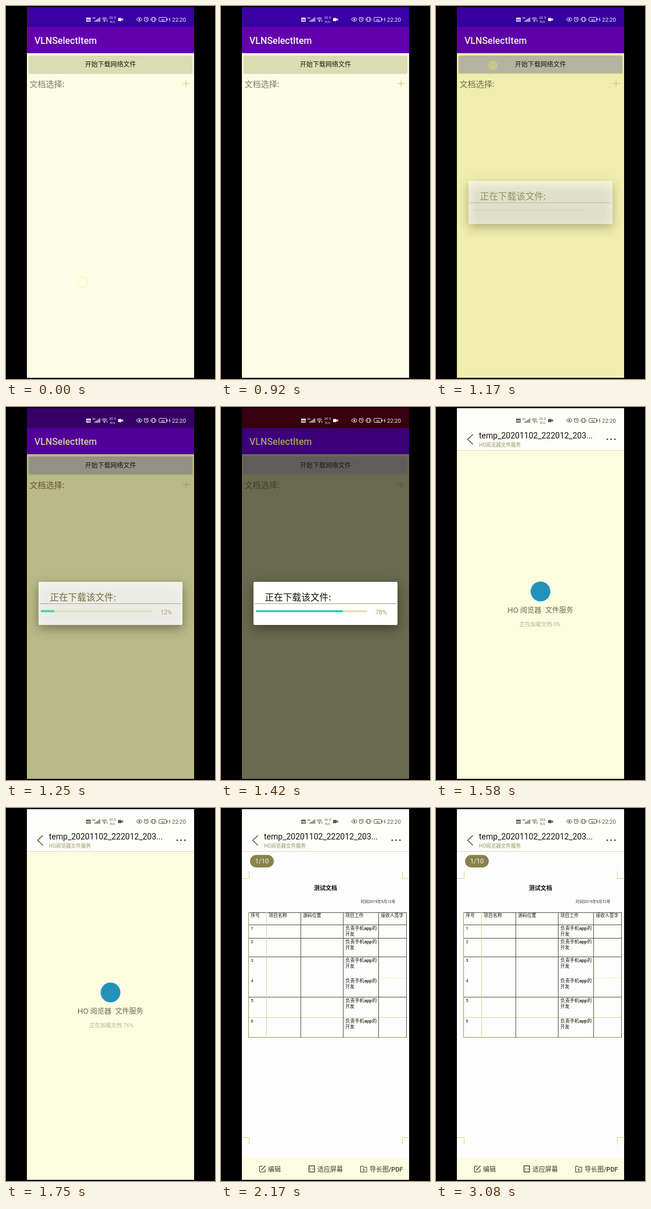
Recreate the animation shown at these times as an HTML page with a canvas. Size 360 by 640 pixels, loop 3660 ms.

```html
<!DOCTYPE html>
<html lang="zh-CN">
<head>
<meta charset="utf-8">
<title>File viewer</title>
<style>
html, body { margin: 0; width: 100%; height: 100%; overflow: hidden; background: #000; }
canvas { display: block; width: 360px; height: 640px; }
</style>
</head>
<body>
<canvas id="stage" width="360" height="640"></canvas>
<script>
const g = document.getElementById('stage').getContext('2d');
const LOOP = 3660;
const FONT = 'Roboto, "Noto Sans CJK SC", "Noto Sans CJK", sans-serif';
const CJK = '"Noto Sans CJK SC", "Noto Sans CJK", sans-serif';

// Colours for the idle, opening and fully dimmed screen
const TONES = {
  page: [[253, 253, 230], [240, 238, 174], [105, 105, 80]],
  bar: [[99, 0, 174], [93, 0, 168], [60, 0, 122]],
  status: [[57, 0, 164], [54, 0, 158], [54, 0, 16]],
  button: [[220, 219, 177], [181, 180, 160], [94, 93, 91]],
  title: [[247, 245, 238], [240, 236, 205], [166, 158, 98]],
  label: [[124, 121, 98], [112, 108, 78], [67, 64, 34]],
  plus: [[217, 209, 132], [209, 202, 132], [82, 81, 72]]
};

function tone(name, d) {
  const i = d < 1 ? 0 : 1, set = TONES[name];
  return `rgb(${set[i].map((v, k) => Math.round(v + (set[i + 1][k] - v) * (d - i)))})`;
}

function rect(x, y, w, h, color) {
  g.fillStyle = color;
  g.fillRect(x, y, w, h);
}

function round(x, y, w, h, r, color) {
  g.fillStyle = color;
  g.beginPath();
  g.roundRect(x, y, w, h, r);
  g.fill();
}

function disc(x, y, r, color) {
  g.fillStyle = color;
  g.beginPath();
  g.arc(x, y, r, 0, Math.PI * 2);
  g.fill();
}

function ring(x, y, r, a = 0, b = Math.PI * 2) {
  g.beginPath();
  g.arc(x, y, r, a, b);
  g.stroke();
}

function path(points, color, width = 1) {
  g.strokeStyle = color;
  g.lineWidth = width;
  g.beginPath();
  for (let i = 0; i < points.length; i += 2) g.lineTo(points[i], points[i + 1]);
  g.stroke();
}

function text(str, x, y, size, color, { weight = 400, align = 'left', face = FONT } = {}) {
  g.font = `${weight} ${size}px ${face}`;
  g.textAlign = align;
  g.fillStyle = color;
  g.fillText(str, x, y);
}

function statusBar(ink, paper, t) {
  round(138, 20, 8, 7, 1, ink);
  text('HD', 142, 25.5, 5, paper, { weight: 700, align: 'center' });

  text('5G', 149, 22, 4, ink, { weight: 700 });
  for (let i = 0; i < 5; i++) rect(152 + i * 2.2, 25.5 - i * 1.5, 1.3, 1.5 + i * 1.5, ink);

  g.strokeStyle = ink;
  g.lineWidth = 1;
  for (const r of [2.5, 4.7, 7]) ring(169.5, 27, r, -2.3, -0.84);
  disc(169.5, 26.3, 1, ink);
  if (t < 2830 || t >= 3080) rect(173.5, 24, 1, 3, ink);

  text(t < 2750 ? '20.5' : '353', 183.5, 22.3, 5.8, ink, { align: 'center' });
  text('K/s', 183.5, 29, 5.5, ink, { align: 'center' });

  round(193, 20.5, 6, 5.5, 1, ink);
  g.beginPath();
  g.moveTo(198.5, 23);
  g.lineTo(201.5, 20.8);
  g.lineTo(201.5, 25.8);
  g.fill();

  g.lineWidth = 1;
  g.beginPath();
  g.ellipse(229.7, 23, 4.3, 3, 0, 0, Math.PI * 2);
  g.stroke();
  disc(229.7, 23, 1.6, ink);

  ring(241.5, 23.3, 3.4);
  path([241.5, 21.2, 241.5, 23.6, 243.2, 23.6], ink, 0.8);
  path([237.5, 20.6, 239.3, 18.8], ink);
  path([243.7, 18.8, 245.5, 20.6], ink);

  g.strokeRect(251.8, 19.5, 4.4, 7);
  path([249.8, 20.8, 249.8, 25.3], ink);
  path([258.2, 20.8, 258.2, 25.3], ink);

  g.lineWidth = 0.9;
  g.beginPath();
  g.roundRect(263.5, 19.5, 13, 7, 1.5);
  g.stroke();
  rect(277, 21.5, 1.3, 3, ink);
  text('40', 270, 25.5, 6, ink, { align: 'center' });
  path([282.5, 19.8, 280.7, 23.2, 283, 23.2, 281.4, 26.6], ink, 0.9);
  text('22:20', 286, 26.7, 9.6, ink);
}

function homeScreen(t, d) {
  rect(36, 2, 288, 636, tone('page', d));
  rect(36, 2, 288, 34, tone('status', d));
  rect(36, 36, 288, 45, tone('bar', d));
  statusBar('#f4f2ee', tone('status', d), t);
  text('VLNSelectItem', 49, 65, 16, tone('title', d), { weight: 500 });

  g.save();
  g.shadowColor = 'rgba(80,80,20,.3)';
  g.shadowBlur = 2;
  g.shadowOffsetY = 1;
  round(39, 85, 282, 30, 2, tone('button', d));
  g.restore();
  text('开始下载网络文件', 180, 104, 11, '#1c1b10', { weight: 500, align: 'center' });

  text('文档选择:', 40.5, 138.5, 14.1, tone('label', d), { face: CJK });
  path([304.5, 133, 316, 133], tone('plus', d), 1.3);
  path([310.2, 127.3, 310.2, 138.8], tone('plus', d), 1.3);
}

function dialog(alpha, pct) {
  g.save();
  g.globalAlpha = alpha;
  g.save();
  g.shadowColor = 'rgba(30,30,0,.5)';
  g.shadowBlur = 18;
  g.shadowOffsetY = 6;
  round(56, 300, 248, 74, 2, '#fff');
  g.restore();
  text('正在下载该文件:', 75.5, 332, 15.7, alpha < 1 ? '#605c20' : '#121208', { weight: 500, face: CJK });
  rect(58, 337, 244, 1, '#a5a286');
  if (pct) {
    rect(60, 348.7, 192, 3.3, '#e4dfa9');
    rect(60, 348.7, 1.92 * pct, 3.3, '#12d6ac');
    text(pct + '%', 276, 355.7, 10.8, '#a29d59', { align: 'center' });
  } else {
    rect(60, 350, 192, 1, '#ccc89c');
  }
  g.restore();
}

function viewerHeader(t) {
  rect(36, 2, 288, 72, '#fdfdfb');
  rect(36, 74, 288, 1, '#dfddb8');
  statusBar('#5b5935', '#fdfdfb', t);
  path([63.5, 47, 54.5, 55.5, 63.5, 64], '#55522a', 1.4);
  text('temp_20201102_222012_203...', 74, 54, 14, '#161608');
  text('HO阅览器文件服务', 74, 68, 8.6, '#9b965e');
  for (let i = 0; i < 3; i++) disc(295 + i * 6.6, 55.3, 1.4, '#4b481f');
}

function loadScreen(t, pct) {
  rect(36, 2, 288, 636, '#fcfce1');
  viewerHeader(t);
  disc(180, 316.5, 17, '#2292ba');
  const ink = '#6c694c';
  text('HO', 123, 353, 13.5, ink);
  text('阅览器', 145, 353, 12.2, ink);
  rect(184.5, 344, 0.7, 10, '#d9d6b0');
  text('文件服务', 188, 353, 12.1, ink);
  text('正在加载文档 ' + pct + '%', 143.5, 376, 9.4, '#b7b391');
}

function pageCorners() {
  for (const [x, dx] of [[48.5, -12], [312.5, 12]])
    for (const [y, dy] of [[121, -12], [565.5, 12]])
      path([x + dx, y, x, y, x, y + dy], '#d4cd72', 0.9);
}

function table() {
  const cols = [48, 79, 138, 211, 272, 320];
  const rows = [180, 201, 224, 256, 290, 325, 360, 394];
  const dark = '#45432d', pale = '#d8d390', olive = '#918d45';
  const colInk = [olive, pale, dark, dark, dark, dark];
  const rowInk = [dark, dark, dark, dark, null, dark, pale, olive];
  rows.forEach((y, i) => rowInk[i] && path([48, y - 0.5, 320, y - 0.5], rowInk[i], 0.9));
  cols.forEach((x, i) => path([x - 0.5, 179, x - 0.5, 394], colInk[i], 0.9));
  g.setLineDash([2, 2]);
  path([272, 291.5, 320, 291.5], '#e4e0b4', 0.9);
  g.setLineDash([]);

  const ink = '#161612';
  ['序号', '项目名称', '源码位置', '项目工作', '接收人签字'].forEach((s, i) =>
    text(s, cols[i] + 3.3, 187, 7.8, ink, { weight: 500 }));
  [209, 232, 264, 299, 333, 368].forEach((y, i) => {
    text(i + 1, 51.3, y, 7.8, ink);
    text('负责手机app的', 214.3, y, 8.1, ink, { weight: 500 });
    text('开发', 214.3, y + 10, 7.8, ink, { weight: 500 });
  });
}

function toolbar() {
  rect(36, 600, 288, 38, '#fcfce3');
  const ink = '#3d3a20';
  text('编辑', 81, 623.5, 11, ink, { weight: 500 });
  text('适应屏幕', 166, 623.5, 11, ink, { weight: 500 });
  text('导长图/PDF', 256, 623.5, 11, ink, { weight: 500 });

  path([72, 614.5, 66.5, 614.5, 66.5, 624.5, 76, 624.5, 76, 619.5], ink);
  path([69.5, 621.5, 76.5, 614], ink, 1.3);

  g.strokeRect(151.5, 614, 9.5, 10.5);
  path([153, 619.3, 155.3, 619.3], ink);
  path([157.2, 619.3, 159.5, 619.3], ink);

  path([240.5, 624.5, 240.5, 614.5, 244.5, 614.5, 246, 616.3, 251, 616.3, 251, 624.5, 240, 624.5], ink);
  path([245.8, 617.5, 245.8, 622.3], ink);
  path([243.7, 620.3, 245.8, 622.4, 247.9, 620.3], ink);
}

function documentScreen(t) {
  rect(36, 2, 288, 636, '#fdfdfd');
  viewerHeader(t);
  pageCorners();
  text('测试文档', 180, 141, 10, '#0c0c08', { weight: 700, align: 'center' });
  text('时间2019年9月12号', 300.5, 163, 6.7, '#35331c', { align: 'right' });
  table();
  round(50, 80.5, 41, 21.5, 10.75, '#88834d');
  text('1/10', 70.5, 95.3, 11.2, '#f8f7e9', { align: 'center' });
  toolbar();
}

// start, dim, dialog opacity, percent
const STEPS = [
  [0, 0, 0, 0], [1170, 1, 0.6, 0], [1250, 1.4, 0.85, 12],
  [1330, 1.8, 1, 45], [1420, 2, 1, 78], [1500, 1.5, 0, 0]
];

function draw(t) {
  rect(0, 0, 360, 640, '#000');
  if (t >= 1830) return documentScreen(t);
  if (t >= 1580) return loadScreen(t, t < 1670 ? 0 : t < 1750 ? 32 : 76);

  const [, dim, alpha, pct] = STEPS.findLast(s => t >= s[0]);
  homeScreen(t, dim);
  if (t < 80) {
    g.strokeStyle = '#f1eda0';
    g.lineWidth = 1;
    g.setLineDash([3, 1]);
    ring(132, 474, 9);
    g.setLineDash([]);
  }
  if (t >= 1080 && t < 1250) disc(98, 102, 8.3, '#c9c58f');
  if (alpha) dialog(alpha, pct);
}

const start = performance.now();
function tick() {
  draw((performance.now() - start) % LOOP);
  requestAnimationFrame(tick);
}
tick();
</script>
</body>
</html>
```
